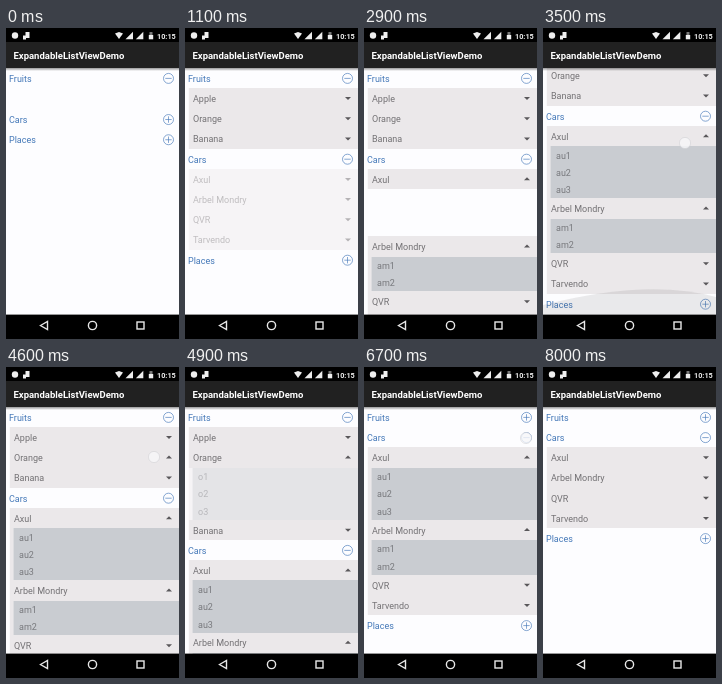
Animation of 173x311 px, one loop 8.1 s. Source, as an HTML page with a canvas:

```html
<!DOCTYPE html>
<html>
<head>
<meta charset="utf-8">
<style>
  html, body { margin: 0; width: 100%; height: 100%; overflow: hidden; background: #000; }
  canvas { display: block; width: 173px; height: 311px; }
</style>
</head>
<body>
<canvas id="stage"></canvas>
<script>
const W = 173, H = 311, LOOP = 8100, STEP = 100;
const LIST_TOP = 39.9, LIST_BOTTOM = 286.6;
const BLUE = '#4478b8', FONT = 'Roboto, sans-serif';
const LEVELS = [
  { x: 3, height: 20.2, color: BLUE },
  { x: 8, height: 20.2, color: '#737174' },
  { x: 13, height: 17.4, color: '#78797d' },
];

const canvas = document.getElementById('stage');
const scale = window.devicePixelRatio || 1;
canvas.width = W * scale;
canvas.height = H * scale;
const ctx = canvas.getContext('2d');
ctx.scale(scale, scale);

// Each toggle time flips a row between closed and open.
const row = (name, toggles = [], kids = []) => ({ name, toggles, kids });
const leaves = (...names) => names.map(name => row(name));
const tree = [
  row('Fruits', [-100, 5500], [
    row('Apple'),
    row('Orange', [4600, 7300], leaves('o1', 'o2', 'o3')),
    row('Banana'),
  ]),
  row('Cars', [800, 6800, 7600], [
    row('Axul', [2700, 7300], leaves('au1', 'au2', 'au3')),
    row('Arbel Mondry', [1600, 7300], leaves('am1', 'am2')),
    row('QVR'),
    row('Tarvendo'),
  ]),
  row('Places'),
];

// x, y, from, to
const taps = [
  [162, 131, 600, 900], [148, 172, 1600, 1700], [148, 151, 2600, 2800],
  [148, 90, 4500, 4700], [162, 50, 5400, 5600], [162, 71, 6700, 6900],
  [162, 71, 7500, 7700],
];

const clamp = p => Math.max(0, Math.min(1, p));
const ease = p => (1 - Math.cos(Math.PI * clamp(p))) / 2;

// Opening makes room, then fades in; closing fades out, then gives the room back.
function expansion(toggles, t) {
  const past = toggles.filter(time => time <= t);
  const open = past.length % 2 === 1;
  const age = t - (past.at(-1) ?? -1e4);
  return open
    ? { open, space: ease(age / 250), alpha: clamp((age - 250) / 120) }
    : { open, space: 1 - ease((age - 120) / 250), alpha: 1 - clamp(age / 120) };
}

function rect(color, x, y, w, h) {
  ctx.fillStyle = color;
  ctx.fillRect(x, y, w, h);
}

function text(string, x, y, color, size, weight = 400) {
  ctx.font = `${weight} ${size}px ${FONT}`;
  ctx.fillStyle = color;
  ctx.fillText(string, x, y);
}

function polygon(color, ...points) {
  ctx.fillStyle = color;
  ctx.beginPath();
  points.forEach(([x, y]) => ctx.lineTo(x, y));
  ctx.closePath();
  ctx.fill();
}

function circle(x, y, r) {
  ctx.beginPath();
  ctx.arc(x, y, r, 0, 2 * Math.PI);
}

function drawSign(y, open) {
  ctx.strokeStyle = BLUE;
  ctx.lineWidth = 0.65;
  circle(162.5, y, 5);
  ctx.moveTo(159.3, y);
  ctx.lineTo(165.7, y);
  if (!open) {
    ctx.moveTo(162.5, y - 3.2);
    ctx.lineTo(162.5, y + 3.2);
  }
  ctx.stroke();
}

function drawRow(name, level, y, open) {
  const { x, height, color } = LEVELS[level];
  const top = Math.round(y), h = Math.round(y + height) - top;
  const middle = y + height / 2;
  if (level > 0) rect('#ebe8ea', 3.8, top, W, h);
  if (level > 1) rect('#c9ccd1', 7.6, top, W, h);
  text(name, x, middle + 3.7, color, 9);
  if (level === 0) drawSign(middle + 0.4, open);
  if (level === 1) {
    const d = open ? -1.5 : 1.5, m = middle + (open ? -0.3 : 0.4);
    polygon('#59575a', [160, m - d], [166, m - d], [163, m + d]);
  }
}

function drawRows(rows, level, y, alpha, t) {
  for (const { name, toggles, kids } of rows) {
    const state = expansion(toggles, t);
    ctx.globalAlpha = alpha;
    if (alpha > 0) drawRow(name, level, y, state.open);
    y += LEVELS[level].height;
    const end = drawRows(kids, level + 1, y, alpha * state.alpha, t);
    y += (end - y) * state.space;
  }
  ctx.globalAlpha = 1;
  return y;
}

function drawGlow(t) {
  const strength = 1 - Math.abs(t - 3500) / 200;
  if (strength <= 0) return;
  ctx.fillStyle = `rgba(33,33,33,${0.09 * strength})`;
  ctx.beginPath();
  ctx.moveTo(0, LIST_BOTTOM);
  ctx.lineTo(0, 277);
  ctx.quadraticCurveTo(105, 250, W, 269);
  ctx.lineTo(W, LIST_BOTTOM);
  ctx.fill();
}

function drawTouch(x, y) {
  circle(x, y, 5.6);
  ctx.fillStyle = 'rgba(247,246,249,.82)';
  ctx.fill();
  ctx.strokeStyle = 'rgba(205,204,208,.7)';
  ctx.lineWidth = 0.7;
  ctx.stroke();
}

function drawBars() {
  rect('#000', 0, 0, W, 14);
  rect('#212121', 0, 14, W, 26);
  const shadow = ctx.createLinearGradient(0, 40, 0, 43);
  shadow.addColorStop(0, 'rgba(0,0,0,.4)');
  shadow.addColorStop(1, 'rgba(0,0,0,0)');
  rect(shadow, 0, 40, W, 3);
  text('ExpandableListViewDemo', 7.5, 30.5, '#fff', 9.5, 700);

  circle(9, 7.5, 3.2);
  ctx.fillStyle = '#eee';
  ctx.fill();
  rect('#eee', 19.5, 4, 4, 6);
  rect('#eee', 17, 7.5, 3, 4);
  polygon('#eee', [109, 5.5], [113, 4], [117, 5.5], [113, 11]);
  for (const x of [127, 137.3]) polygon('#eee', [x, 3.8], [x, 11.3], [x - 7.5, 11.3]);
  rect('#777', 143.5, 4, 3, 3);
  rect('#eee', 142.8, 7, 4.4, 4.3);
  text('10:15', 151, 10.5, '#eee', 7.3, 700);

  rect('#000', 0, LIST_BOTTOM, W, H - LIST_BOTTOM);
  ctx.strokeStyle = '#e8e8e8';
  ctx.lineWidth = 1.4;
  ctx.beginPath();
  ctx.moveTo(34.5, 297.5);
  ctx.lineTo(41.5, 293.5);
  ctx.lineTo(41.5, 301.5);
  ctx.closePath();
  ctx.stroke();
  circle(86.5, 297.5, 4.1);
  ctx.stroke();
  ctx.strokeRect(131, 294, 7, 7);
}

function draw(t) {
  const up = ease((t - 3300) / 200), down = ease((t - 3600) / 400);
  rect('#fdfdff', 0, 0, W, H);
  drawRows(tree, 0, LIST_TOP - 43 * up * (1 - down), 1, t);
  drawGlow(t);
  for (const [x, y, from, to] of taps) if (t >= from && t < to) drawTouch(x, y);
  if (t >= 3400 && t < 4100) drawTouch(142, 160 - 45 * up + 60 * down);
  drawBars();
}

function tick() {
  draw(Math.floor(performance.now() % LOOP / STEP) * STEP);
  requestAnimationFrame(tick);
}
tick();
</script>
</body>
</html>
```
